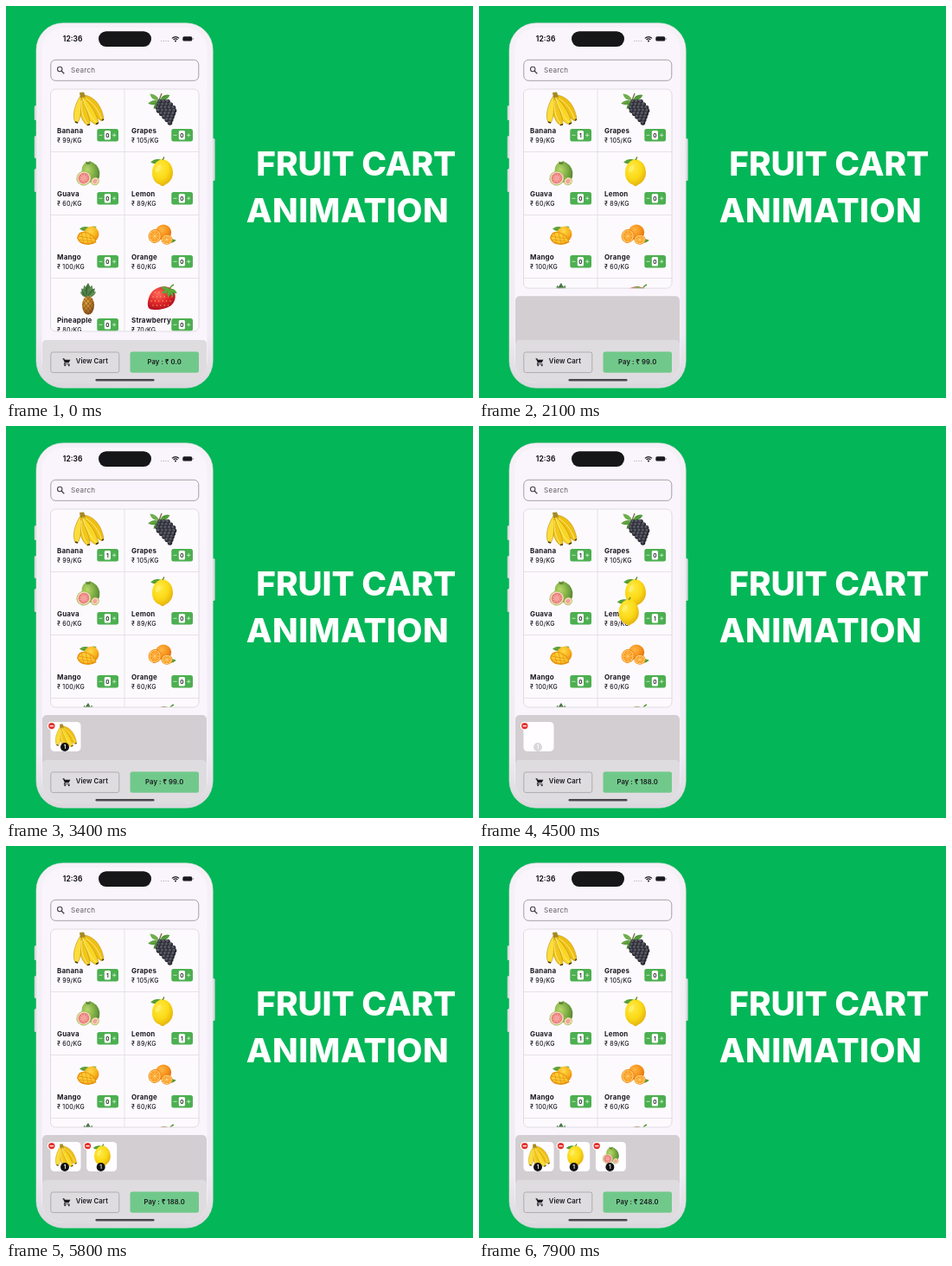
These frames come from a looping animation (540 by 453 pixels, 8000 ms). An HTML page:

```html
<!DOCTYPE html>
<html lang="en">
<head>
<meta charset="utf-8">
<title>Fruit cart animation</title>
<style>
html, body { margin: 0; width: 100%; height: 100%; overflow: hidden; background: #03b657; }
svg { display: block; width: 100vw; height: 100vh; }
text { font-family: Inter, Roboto, sans-serif; fill: #1b1920; }
.name { font-size: 8px; font-weight: 700; letter-spacing: .18px; }
.price { font-size: 7px; font-weight: 500; letter-spacing: .25px; }
.btn { font-size: 7.7px; font-weight: 600; letter-spacing: .08px; }
.num { font-size: 6.5px; font-weight: 600; text-anchor: middle; }
.title { font-size: 38.8px; font-weight: 800; fill: #fff; }
</style>
</head>
<body>
<svg id="stage" viewBox="0 0 540 453"></svg>
<script>
const LOOP = 8000, FLIGHT = 800, PITCH = 41.7;
const stage = document.getElementById('stage');
const $ = id => document.getElementById(id);
const clamp = v => Math.max(0, Math.min(1, v));
const ramp = (t, start, len) => clamp((t - start) / len);
const smooth = u => u * u * (3 - 2 * u);
const easeOut = u => 1 - (1 - u) ** 3;

const rect = (x, y, w, h, r, fill, more = '') =>
  `<rect x="${x}" y="${y}" width="${w}" height="${h}" rx="${r}" fill="${fill}" ${more}/>`;
const oval = (x, y, rx, ry, fill, rot = 0, more = '') =>
  `<ellipse cx="${x}" cy="${y}" rx="${rx}" ry="${ry}" fill="${fill}" transform="rotate(${rot} ${x} ${y})" ${more}/>`;
const path = (d, fill, more = '') => `<path d="${d}" fill="${fill}" ${more}/>`;
const line = (d, color, w, more = '') => path(d, 'none', `stroke="${color}" stroke-width="${w}" ${more}`);
const text = (x, y, s, cls, more = '') => `<text x="${x}" y="${y}" class="${cls}" ${more}>${s}</text>`;
const leaf = (x, y, len, rot, fill = '#45922e') =>
  `<g transform="translate(${x} ${y}) rotate(${rot})">${path(`M0 0Q${len / 2} ${-len * .42} ${len} 0Q${len / 2} ${len * .34} 0 0`, fill)}${line(`M1 0H${len - 2}`, '#8dbb60', .4)}</g>`;
const repeat = (n, fn) => Array.from({ length: n }, (_, i) => fn(i)).join('');
const shade = (id, a, b, c) => `<radialGradient id="${id}" cx=".38" cy=".32" r=".75"><stop stop-color="${a}"/>
  <stop offset=".55" stop-color="${b}"/><stop offset="1" stop-color="${c}"/></radialGradient>`;

// Fruit drawings, each centred on 0,0
function banana() {
  const peel = (d, fill) => path(d, fill, 'stroke="#b98b10" stroke-width=".6"');
  return peel('M-6-16C4-16 15-7 18 11L16 14C10 11 2 3-4-12Z', '#efbf12')
    + peel('M-7-15C-1-10 9 2 12 16L9 18C0 14-6 4-8-12Z', '#f9d625')
    + peel('M-8-15C-5-6 2 8 2 18L-1 19C-9 13-12 0-9-13Z', '#f2c61a')
    + peel('M-8-15C-9-4-7 8-12 16L-15 15.5C-19 7-15-6-9-15Z', '#fbdd3b')
    + line('M-3-12C5-8 12 1 15 11M-6-12C-3-1 4 11 9 15M-8-10C-9 2-5 12-1 17', '#ffec82', 1)
    + path('M-10-19L-5-19.5L-3-14L-9-13Z', '#a58a24')
    + line('M16 13L18 12M9 17.5L12 16M-1 18.5L2 18M-15 15L-12 16', '#46380e', 1.6);
}
function grapes() {
  const rows = [3, 4, 5, 5, 4, 3, 2, 1];
  return leaf(-3, -9, 13, 168, '#569c38') + leaf(-3, -10, 13, -145, '#6aac48') + leaf(-3, -9, 11, 125, '#3f8530')
    + leaf(-2, -10, 13, -28, '#4a9433') + line('M-3-10L0-18', '#75653a', 1.3)
    + rows.map((n, r) => repeat(n, i => oval((i - (n - 1) / 2) * 4.5 + 2.5 + r, -8.5 + r * 3.5, 2.8, 2.8, 'url(#gGrape)'))).join('');
}
function guava() {
  const half = (x, y, rx, ry, rot) => oval(x, y, rx, ry, '#a9bf57', rot) + oval(x, y, rx - .9, ry - .9, '#f6dcc2', rot)
    + oval(x, y, rx - 2.2, ry - 2.2, '#ea7c80', rot) + oval(x, y, rx * .4, ry * .4, '#f5a29c', rot)
    + repeat(9, i => oval(x + Math.cos(i * .7) * rx * .5, y + Math.sin(i * .7) * ry * .5, .55, .55, '#f9d9a8'));
  return oval(3, -2, 10, 12.5, 'url(#gGuava)', -25) + path('M-3-14.5l3 1.5 3-2-1 4h-4z', '#648638')
    + half(-5, 5, 8.6, 8.4, -25) + half(8, 8.5, 4.6, 5, 50);
}
function lemon() {
  return leaf(1, -13.5, 14, 172, '#4b9a2e') + leaf(-1, -13, 8, 130, '#6db33b')
    + path('M1-15C8-14 13-8 13 1C13 8 8 13 4 14.5Q1 18-2 14.5C-7 13-11 8-11 1C-11-8-6-14 1-15Z', 'url(#gLemon)')
    + line('M1-14Q2-16 3-17.5', '#6c8c33', 1.4) + oval(-4, -4, 2.6, 4.5, '#fff27d', 25, 'opacity=".65"');
}
function mango() {
  return leaf(3, -8, 13, 178, '#579b35') + leaf(2, -8, 8, -10, '#72ac3d')
    + oval(3.5, -1, 8.8, 9.4, 'url(#gMango)', 20)
    + path('M-13 3Q-11-6-3-4Q8-1 9.5 8Q4 12-4 10.5Q-11 9.5-13 3Z', '#e99512')
    + path('M-11.5 3Q-9.5-4-3-3Q6 0 8 7Q2 9.5-4 8.5Q-10 7.5-11.5 3Z', '#ffcb32')
    + line('M-8-3L-5 9M-3-3L0 9M2-1L4 8M-11 1L6 4M-11 5L7 7', '#e79a17', .9);
}
function orange() {
  const slice = (x, y, rx, ry, rot) => oval(x, y, rx, ry, '#f08a0c', rot) + oval(x, y, rx - .9, ry - .9, '#ffe3a6', rot)
    + oval(x, y, rx - 1.6, ry - 1.6, '#fa9c1e', rot)
    + repeat(4, i => { const a = i * Math.PI / 4, c = Math.cos(a) * (rx - 1.6), s = Math.sin(a) * (ry - 1.6);
      return line(`M${x - c} ${y - s}L${x + c} ${y + s}`, '#ffdb93', .6); });
  return oval(2, -2.5, 9.2, 9, 'url(#gOrange)') + leaf(6, 9, 11, -12, '#4d9730')
    + slice(-8, 2, 7.4, 8, 15) + slice(6, 6, 6.6, 5.8, 0);
}
function pineapple() {
  return repeat(7, i => leaf(0, -1, 17 - Math.abs(i - 3) * 1.9, -90 + (i - 3) * 18, i % 2 ? '#3b6a3c' : '#58854c'))
    + oval(0, 8, 7, 10.8, 'url(#gPine)')
    + line('M-6 4L4 17M-5 0L6 13M-2-2L7 8M-6 9L0 18M6 4L-4 17M5 0L-6 13M2-2L-7 8M6 9L0 18', '#74481a', .7);
}
function strawberry() {
  return path('M10-11C17-8 18 3 11 9C4 14-8 15-14 13C-18 10-16-1-11-7C-5-13 4-14 10-11Z', 'url(#gBerry)')
    + repeat(24, i => { const x = -12 + i % 6 * 4.4 + (i / 6 | 0) % 2 * 2, y = -6 + (i / 6 | 0) * 5;
      return x + y > 18 ? '' : oval(x, y, .55, .8, '#f8cf6b'); })
    + [100, 150, 190, 30, 65].map(a => leaf(9, -10, 10, a, '#4fa532')).join('') + line('M9-10Q11-14 14-15', '#5d9a35', 1.4);
}

const fruits = [
  ['Banana', 99, banana, 119], ['Grapes', 105, grapes, 119],
  ['Guava', 60, guava, 194], ['Lemon', 89, lemon, 192],
  ['Mango', 100, mango, 265], ['Orange', 60, orange, 264],
  ['Pineapple', 80, pineapple, 338], ['Strawberry', 70, strawberry, 337]
].map(([name, price, draw, y], i) => ({ name, price, draw, y, x: i % 2 ? 180 : 95 }));

// Items put in the cart: tap time, start of flight, size in the tile
const adds = [
  { fruit: 0, tap: 1850, fly: 2210, scale: .7 },
  { fruit: 3, tap: 4270, fly: 4315, scale: .78 },
  { fruit: 2, tap: 5840, fly: 5850, scale: .7 }
];

function cell(f, i) {
  const dx = i % 2 * 86, dy = (i >> 1) * 73;
  return `<use href="#${f.name}" x="${f.x}" y="${f.y}"/><g transform="translate(${dx} ${dy})">`
    + text(59, 147, f.name, 'name') + text(59, 157.6, `₹ ${f.price}/KG`, 'price')
    + rect(105.3, 142, 24.7, 14.6, 2.5, '#4caf50') + rect(113.8, 144, 7.2, 10.6, 1.5, '#fff')
    + line('M107.5 149.3h4M123.1 149.3h4.2M125.2 147.2v4.2', '#d9f2da', .8)
    + text(117.4, 151.7, '0', 'num', `id="qty${i}"`) + '</g>';
}
const tile = (a, i) => `<g id="tile${i}">${rect(51.5, 342, 35, 34, 4.5, '#fffdff')}
  <use id="pic${i}" href="#${fruits[a.fruit].name}" transform="translate(69 358) scale(${a.scale})"/>
  <g id="badge${i}"><circle cx="68" cy="371" r="5" fill="#111"/>${text(68, 373.4, '1', 'num', 'style="fill:#fff"')}</g>
  <circle cx="52.8" cy="346.6" r="4.9" fill="#fff"/><circle cx="52.8" cy="346.6" r="3.7" fill="#e5322d"/>${line('M50.7 346.6h4.2', '#fff', 1.1)}</g>`;

stage.innerHTML = `<defs>
  ${shade('gGrape', '#6b6c78', '#2e2f38', '#131318')}${shade('gGuava', '#b8d86b', '#7fae45', '#4f8030')}
  ${shade('gLemon', '#ffea45', '#fbd916', '#dfa90c')}${shade('gMango', '#ffd848', '#f8b21b', '#e07d12')}
  ${shade('gOrange', '#ffb646', '#f7921b', '#d96c0b')}${shade('gPine', '#e5aa40', '#bd7b28', '#76471a')}
  ${shade('gBerry', '#ff6a5c', '#e0262b', '#a80f1d')}
  <linearGradient id="body" x2="0" y2="1"><stop stop-color="#f5f1f7"/><stop offset=".85" stop-color="#f0ecf3"/>
    <stop offset="1" stop-color="#dad7dd"/></linearGradient>
  <clipPath id="screen">${rect(41.5, 25, 191, 411, 25, '#000')}</clipPath>
  <clipPath id="listClip"><rect id="clipBox" x="51.5" y="96" width="171.5" height="280" rx="6"/></clipPath>
  ${fruits.map(f => `<g id="${f.name}">${f.draw()}</g>`).join('')}</defs>
  ${rect(0, 0, 540, 453, 0, '#03b657')}
  ${[[32.8, 115, 17], [32.8, 150, 26], [32.8, 188, 27], [237.6, 153, 49]].map(([x, y, h]) => rect(x, y, 4, h, 1.5, '#dcd9e0')).join('')}
  ${rect(35, 19.7, 204.2, 421.6, 31, 'url(#body)', 'stroke="#e2dfe5" stroke-width=".6"')}
  ${rect(41.5, 25, 191, 411, 25, '#faf5fc')}
  ${rect(107, 29.2, 61, 17.8, 8.9, '#161518')}
  ${text(65.8, 41.2, '12:36', '', 'style="font-size:8.4px;font-weight:700"')}
  ${repeat(4, i => oval(179.8 + i * 2.6, 40.4, .7, .7, '#b7b4ba'))}
  ${line('M191.9 37.4Q196 33.7 200.1 37.4M193.6 39Q196 36.9 198.4 39', '#1b1920', 1.2)}${oval(196, 40.4, 1, 1, '#1b1920')}
  ${rect(204.3, 35.2, 11, 5.4, 1.7, '#1b1920')}${rect(215.8, 37, .9, 1.9, .4, '#8a868d')}
  ${rect(51.8, 62.3, 171, 24, 5.5, 'none', 'stroke="#9b979e" stroke-width=".9"')}
  <circle cx="62.2" cy="73" r="2.7" fill="none" stroke="#47434b" stroke-width="1.1"/>${line('M64.1 75L67.3 78.2', '#47434b', 1.3)}
  ${text(75, 77, 'Search', '', 'style="font-size:8px;fill:#5f5a63;letter-spacing:.3px"')}
  <g clip-path="url(#listClip)">${rect(51, 96, 173, 281, 0, '#fdfafe')}
    ${line('M137 96V377M51 168.5H223M51 241.5H223M51 314.5H223', '#e3dfe5', .9)}${fruits.map(cell).join('')}</g>
  <rect id="frame" x="51.5" y="96" width="171.5" height="280" rx="6" fill="none" stroke="#dcd8de" stroke-width=".9"/>
  <g clip-path="url(#screen)">
    <rect id="panel" x="42" y="386" width="190" height="60" rx="5" fill="#d3ced2"/>
    ${adds.map(tile).reverse().join('')}
    ${rect(42, 386, 190, 60, 5, '#dfdce0')}
  </g>
  ${rect(51.8, 400, 79, 23.6, 2.5, 'none', 'stroke="#aaa6ac" stroke-width=".9"')}
  <g transform="translate(5.6 32.9) scale(.92)">${path('M65.2 407h1.9l.7 1.4h7l-2 4h-4.2l-.7 1.2h6v1h-7.6l1.3-2.6-1.8-4h-.6z', '#1b1920')}${oval(68.1, 415.6, 1, 1, '#1b1920')}${oval(73, 415.6, 1, 1, '#1b1920')}</g>
  ${text(80.8, 413.4, 'View Cart', 'btn')}
  ${rect(143.5, 399.6, 79.5, 24.2, 2.5, '#70c98a')}
  ${text(183.2, 414.3, '', 'btn', 'id="pay" text-anchor="middle"')}
  ${rect(103.5, 431, 68, 2.6, 1.3, '#49464c')}
  ${adds.map((a, i) => `<use id="fly${i}" href="#${fruits[a.fruit].name}"/>`).join('')}
  ${text(289.3, 195.6, 'FRUIT CART', 'title', 'letter-spacing="-.1"')}
  ${text(277.8, 250.4, 'ANIMATION', 'title', 'letter-spacing=".4"')}`;

function render(t) {
  const open = easeOut(ramp(t, adds[0].tap, 350));
  for (const id of ['clipBox', 'frame']) $(id).setAttribute('height', 280 - 51 * open);
  $('panel').setAttribute('y', 386 - 52 * open);

  let total = 0;
  adds.forEach((a, i) => {
    const f = fruits[a.fruit], added = t >= a.tap, land = a.fly + FLIGHT;
    if (added) total += f.price;
    $('qty' + a.fruit).textContent = added ? 1 : 0;

    const p = smooth(ramp(t, a.fly, FLIGHT)), fly = $('fly' + i);
    const x = f.x + (69 + i * PITCH - f.x) * p ** 1.1, y = f.y + (358 - f.y) * p;
    fly.setAttribute('transform', `translate(${x} ${y}) scale(${1 + (a.scale - 1) * p})`);
    fly.setAttribute('visibility', t >= a.fly && t < land ? 'visible' : 'hidden');

    const slide = ramp(t, a.fly + 230, 400);
    $('tile' + i).setAttribute('transform', `translate(${i * PITCH - 60 * (1 - easeOut(slide))} 0)`);
    $('tile' + i).setAttribute('visibility', slide > 0 ? 'visible' : 'hidden');

    // Each later item makes the earlier tiles refresh their contents
    let pic = t >= land ? 1 : 0, badge = ramp(t, land - 200, 200);
    for (const b of adds.slice(i + 1)) if (t >= b.fly) {
      const back = ramp(t, b.fly + 400, 200);
      pic = Math.min(pic, back);
      badge = Math.min(badge, Math.max(back, 1 - ramp(t, b.fly, 220)));
    }
    $('pic' + i).setAttribute('opacity', pic);
    $('badge' + i).setAttribute('opacity', badge);
  });
  $('pay').textContent = `Pay : ₹ ${total.toFixed(1)}`;
}

const start = performance.now();
function tick() {
  render((performance.now() - start) % LOOP);
  requestAnimationFrame(tick);
}
tick();
</script>
</body>
</html>
```
